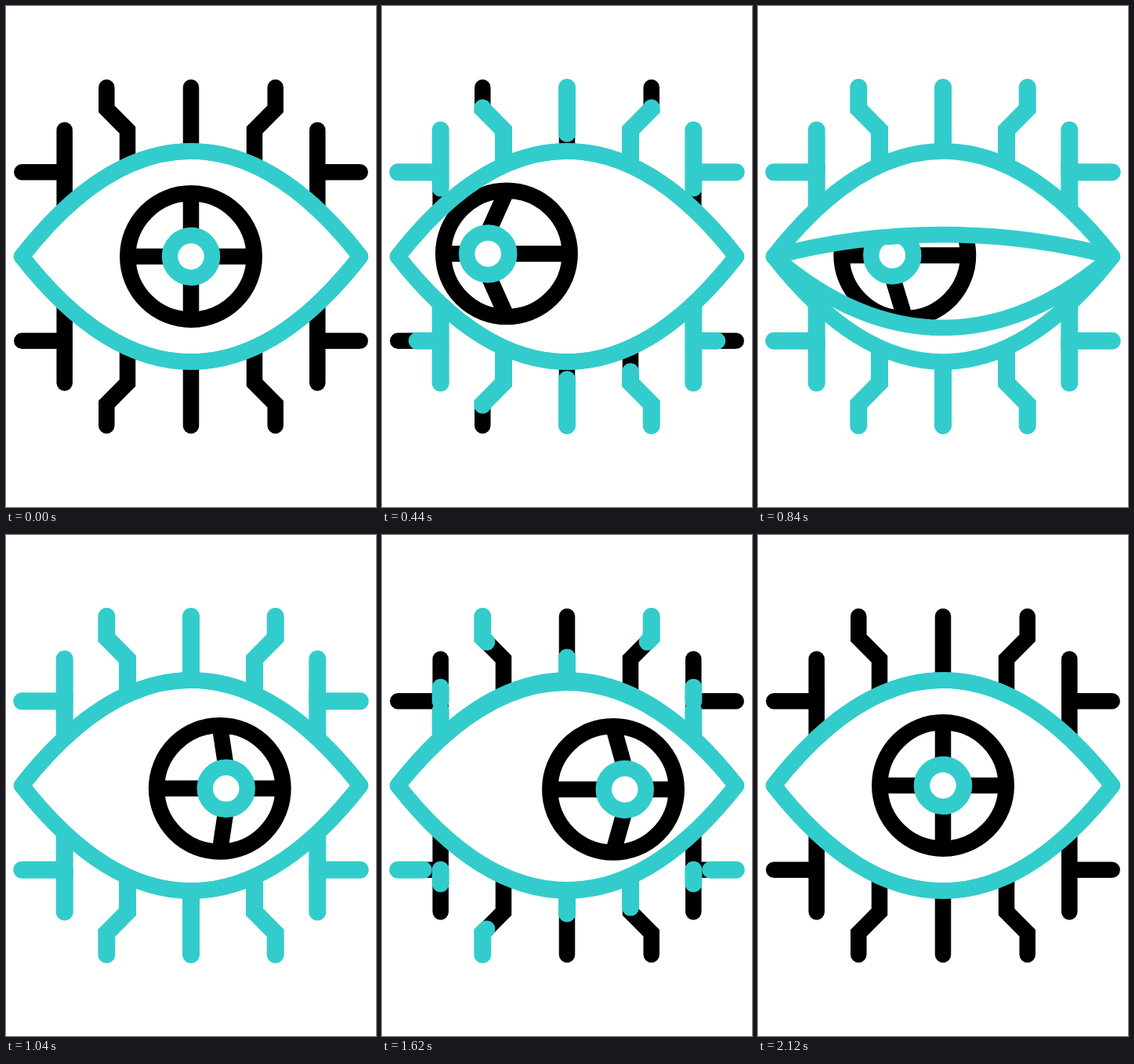
Write an HTML page that moves like this. It is 472x640 px and loops after 2.4 s.

```html
<!DOCTYPE html>
<html lang="en">
<head>
<meta charset="utf-8">
<title>Scanning eye</title>
<style>
  html, body { margin: 0; width: 100%; height: 100%; overflow: hidden; background: #fff; }
  svg { display: block; width: 100%; height: 100%; }
  path, circle { fill: none; stroke-width: 20.5; stroke-linecap: round; }
  .dark { stroke: #000; }
  .teal { stroke: #33cccc; }
  .pulse { stroke-width: 22; }
  #eye, #lids { stroke-linejoin: round; }
  #white, #iris { fill: #fff; }
</style>
</head>
<body>
<svg viewBox="0 0 472 640">
  <clipPath id="opening"><path id="gap"/></clipPath>
  <g id="wires"></g>
  <g id="pulses"></g>
  <path id="white"/>
  <g clip-path="url(#opening)">
    <circle id="ring" class="dark" r="80.7"/>
    <path id="spokes" class="dark"/>
    <circle id="iris" class="teal" r="27"/>
  </g>
  <path id="eye" class="teal"/>
  <path id="lids" class="teal"/>
</svg>
<script>
const LOOP = 2400, STEP = 20;
const OPEN_TOP = 185.5, OPEN_BOTTOM = 454.5;
const $ = id => document.getElementById(id);

const clamp = x => Math.min(1, Math.max(0, x));
const ease = (t, from, to) => {
  const p = clamp((t - from) / (to - from));
  return p * p * (3 - 2 * p);
};

// Each wire is listed in the direction its pulse travels.
const middle = [[236, 104], [236, 182]];
const bend = [[155, 199], [155, 158.5], [128.3, 131.5], [128.3, 104]];
const post = [[74.7, 158.5], [74.7, 212.3]];
const arm = [[20.3, 212.3], [74.7, 212.3], [74.7, 257]];
const flipX = pts => pts.map(([x, y]) => [472 - x, y]);
const flipY = pts => pts.map(([x, y]) => [x, 640 - y]);
const back = pts => [...pts].reverse();

const left = [bend, flipY(bend), post, flipY(post), arm, back(flipY(arm))];
const right = left.map(flipX);
right[1] = back(right[1]);
const wires = [middle, flipY(middle), ...left, ...right];

function addPath(parent, pts, cls) {
  const path = document.createElementNS('http://www.w3.org/2000/svg', 'path');
  path.setAttribute('d', 'M' + pts.join('L'));
  path.setAttribute('class', cls);
  path.setAttribute('pathLength', 1);
  $(parent).append(path);
}
for (const pts of wires) {
  addPath('wires', pts, 'dark');
  addPath('pulses', pts, 'teal pulse');
}

const almond = (top, bottom) =>
  `M20 320Q125 ${top} 236 ${top}Q347 ${top} 452 320Q347 ${bottom} 236 ${bottom}Q125 ${bottom} 20 320Z`;

const setPath = (id, d) => $(id).setAttribute('d', d);
function place(id, x, y) {
  $(id).setAttribute('cx', x);
  $(id).setAttribute('cy', y);
}

setPath('eye', almond(OPEN_TOP, OPEN_BOTTOM));
setPath('white', almond(OPEN_TOP, OPEN_BOTTOM));

function drawPulses(t) {
  const end = ease(t, 40, 632), start = ease(t, 1216, 1870);
  const group = $('pulses');
  group.style.display = end > start ? '' : 'none';
  for (const path of group.children) {
    path.setAttribute('stroke-dasharray', `${Math.max(0, end - start)} 2`);
    path.setAttribute('stroke-dashoffset', -start);
  }
}

function drawIris(t) {
  const toLeft = ease(t, 0, 550), toRight = ease(t, 670, 1220), home = ease(t, 1440, 2000);
  const track = (l, r) => l * toLeft + (r - l) * toRight - r * home;
  const x = 236 + track(-86, 78);
  const ix = 236 + track(-112.5, 97.5);
  const y = 320 + track(-4, 6.5);
  place('ring', x, y);
  place('iris', ix, y);
  setPath('spokes', `M${x} ${y - 80}L${ix} ${y - 27}M${x} ${y + 80}L${ix} ${y + 27}` +
    `M${x - 80} ${y}H${ix - 27}M${x + 80} ${y}H${ix + 27}`);
}

function drawLids(t) {
  const blink = from => ease(t, from, from + 260) - ease(t, from + 260, from + 520);
  const shut = blink(460) + blink(1600);
  const shape = almond(OPEN_TOP + 191 * shut, OPEN_BOTTOM - 78 * shut);
  setPath('lids', shape);
  setPath('gap', shape);
}

function draw(ms) {
  const t = Math.floor(ms % LOOP / STEP) * STEP;
  drawPulses(t);
  drawIris(t);
  drawLids(t);
}

const began = performance.now();
function tick() {
  draw(performance.now() - began);
  requestAnimationFrame(tick);
}
tick();
</script>
</body>
</html>
```
